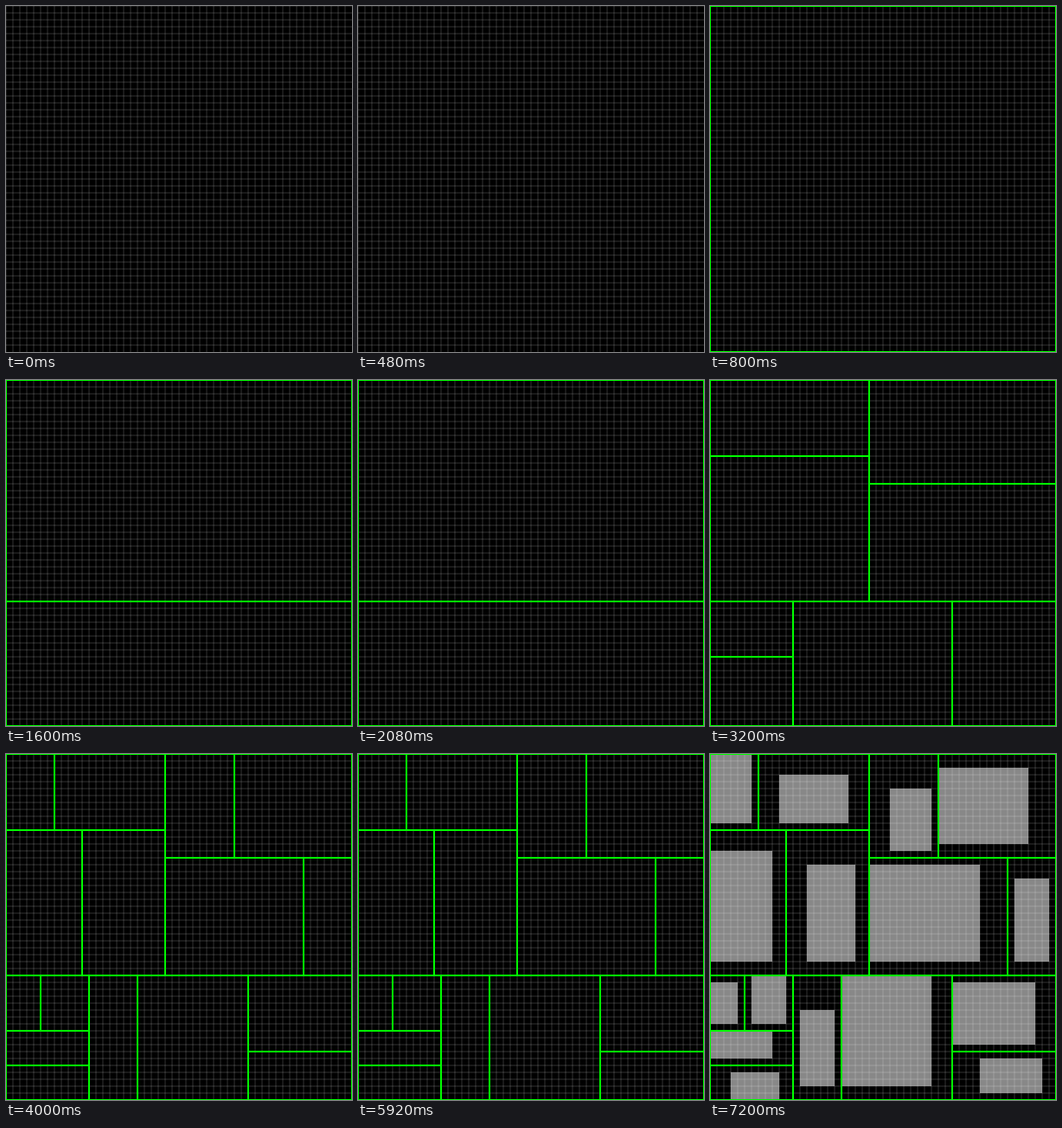
These frames come from a looping animation (400x400 px, 8 s). An HTML page:

```html
<!DOCTYPE html>
<html lang="en">
<head>
<meta charset="utf-8">
<title>Binary space partition</title>
<style>
  html, body { margin: 0; width: 100%; height: 100%; overflow: hidden; background: #000; }
  svg { display: block; width: 100vw; height: 100vh; }
</style>
</head>
<body>
<svg viewBox="0 0 400 400">
  <rect width="400" height="400" fill="#000"/>
  <path id="rooms" fill="#888"/>
  <path id="grid" fill="none" stroke="#fff" stroke-opacity=".2"/>
  <path id="areas" fill="none" stroke="#0f0" stroke-width="2"/>
</svg>
<script>
const CELL = 8, CELLS = 50, STEP = 800, LOOP = 8000, ROOMS_AT = 7200;
const ROOM_WIDTH = 0.79, ROOM_HEIGHT = 0.88;
const $ = id => document.getElementById(id);

// Lengths are in cells, relative to the enclosing area.
const cols = (at, left, right) => ({
  parts: (x, y, w, h) => [[left, x, y, at, h], [right, x + at, y, w - at, h]]
});
const rows = (at, top, bottom) => ({
  parts: (x, y, w, h) => [[top, x, y, w, at], [bottom, x, y + at, w, h - at]]
});
const room = (dx, dy) => ({ dx, dy });

const tree = rows(32,
  cols(23,
    rows(11,
      cols(7, room(0, 0), room(3, 3)),
      cols(11, room(0, 3), room(3, 5))),
    rows(15,
      cols(10, room(3, 5), room(0, 2)),
      cols(20, room(0, 1), room(1, 3)))),
  cols(12,
    rows(8,
      cols(5, room(0, 1), room(1, 0)),
      rows(5, room(0, 0), room(3, 1))),
    cols(23,
      cols(7, room(1, 5), room(0, 0)),
      rows(11, room(0, 1), room(4, 1)))));

const rect = (x, y, w, h) =>
  `M${x * CELL} ${y * CELL}h${w * CELL}v${h * CELL}h${-w * CELL}z`;

// A room fills a fixed share of the space right of and below its corner.
const roomPath = ({ dx, dy }, x, y, w, h) => rect(x + dx, y + dy,
  Math.round((w - dx) * ROOM_WIDTH), Math.round((h - dy) * ROOM_HEIGHT));

const levels = [];
let rooms = '';

function walk(node, x, y, w, h, depth = 0) {
  levels[depth] = (levels[depth] || '') + rect(x, y, w, h);
  if (node.parts) {
    node.parts(x, y, w, h).forEach(part => walk(...part, depth + 1));
  } else {
    rooms += roomPath(node, x, y, w, h);
  }
}
walk(tree, 0, 0, CELLS, CELLS);

let grid = '';
for (let p = 0; p < CELLS * CELL; p += CELL) {
  grid += `M0 ${p}H${CELLS * CELL}M${p} 0V${CELLS * CELL}`;
}
$('grid').setAttribute('d', grid);

function draw(t) {
  const shown = Math.floor(t / STEP);
  $('areas').setAttribute('d', levels.slice(0, shown).join(''));
  $('rooms').setAttribute('d', t >= ROOMS_AT ? rooms : '');
}

const start = performance.now();
function tick() {
  draw((performance.now() - start) % LOOP);
  requestAnimationFrame(tick);
}
tick();
</script>
</body>
</html>
```
